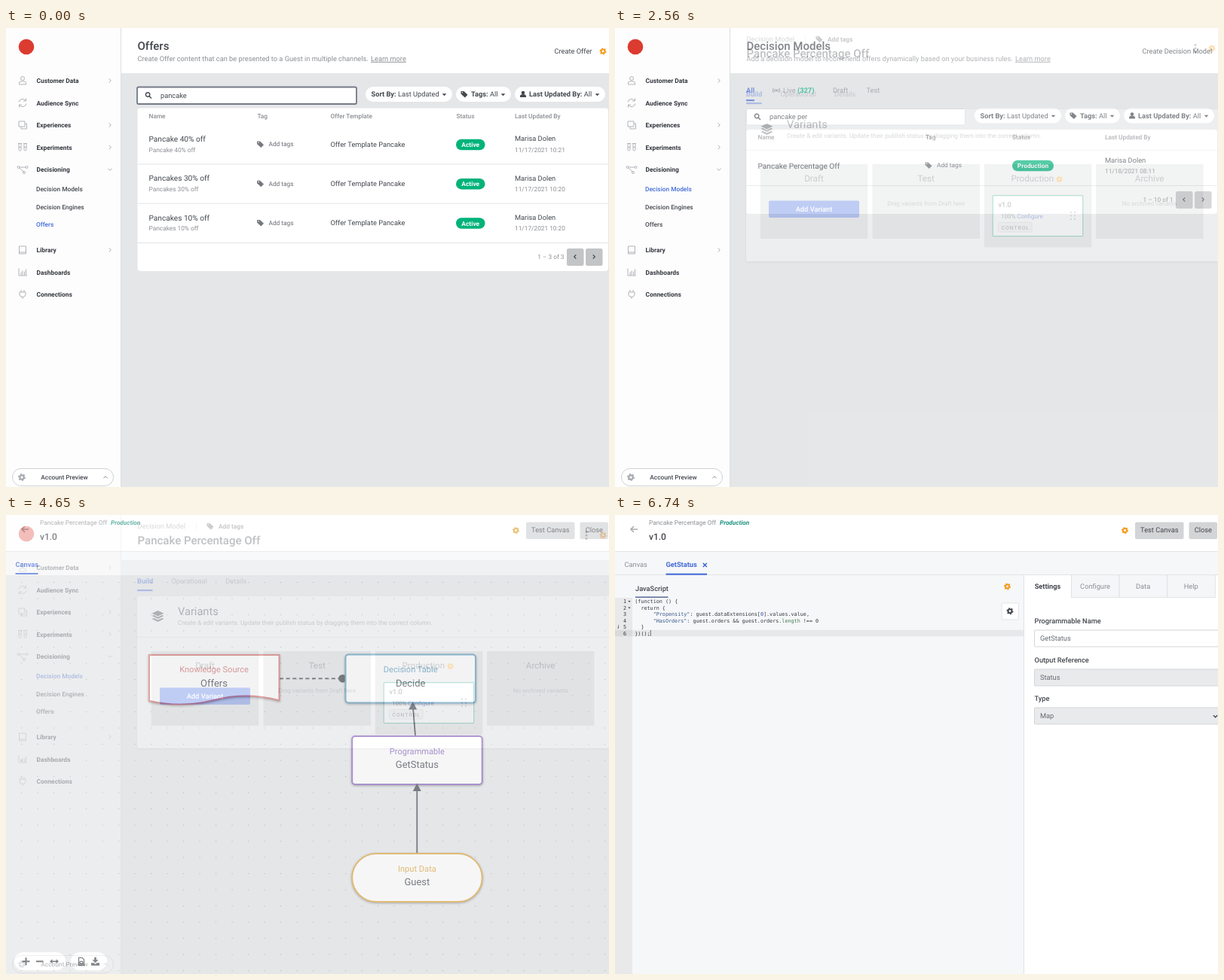
An HTML page for the animation above (8 s loop, 800 by 610 pixels).

```html
<!DOCTYPE html>
<html lang="en">
<head>
<meta charset="utf-8">
<title>Decision model walkthrough</title>
<style>
html, body { margin: 0; width: 100%; height: 100%; overflow: hidden; background: #fff; }
svg { display: block; width: 800px; height: 610px; font-family: Roboto, Arial, sans-serif; text-rendering: geometricPrecision; }
text { white-space: pre; }
.code { font-family: "DejaVu Sans Mono", monospace; }
.raised { filter: drop-shadow(0 1.5px 1.5px #0006); }
</style>
</head>
<body>
<svg id="stage" viewBox="0 0 800 610"></svg>
<script>
const INK = '#43474e', GREY = '#8b8e93', PALE = '#a9acb1', BLUE = '#4169d8',
  GREEN = '#00b37a', ORANGE = '#f49b1b', BACK = '#e5e6e8', LINE = '#e2e3e5';
const SMALL = 8.3, BODY = 9.25, NAME = 10.15, TITLE = 15;

// Text is placed by the middle of its capitals.
const text = (s, x, y, size = BODY, fill = INK, weight = 400, extra = '') =>
  `<text x="${x}" y="${y + size * .36}" font-size="${size}" fill="${fill}" font-weight="${weight}" ${extra}>${s}</text>`;
const mid = (s, x, y, size, fill, weight) => text(s, x, y, size, fill, weight, 'text-anchor="middle"');
const end = (s, x, y, size, fill, weight) => text(s, x, y, size, fill, weight, 'text-anchor="end"');
const box = (x, y, w, h, fill, r = 0, extra = '') =>
  `<rect x="${x}" y="${y}" width="${w}" height="${h}" rx="${r}" fill="${fill}" ${extra}/>`;
const dot = (x, y, r, fill) => `<circle cx="${x}" cy="${y}" r="${r}" fill="${fill}"/>`;
const border = (color, width = 1) => `stroke="${color}" stroke-width="${width}"`;
const line = (d, x, y, color = INK, width = 1) =>
  `<path transform="translate(${x} ${y})" d="${d}" fill="none" ${border(color, width)}/>`;
const solid = (d, x, y, fill = INK) => `<path transform="translate(${x} ${y})" d="${d}" fill="${fill}"/>`;

const gear = (x, y, r, color) => `<g transform="translate(${x} ${y})" fill="none" stroke="${color}">
  <circle r="${r * .55}" stroke-width="${r * .45}"/>
  <circle r="${r * .85}" stroke-width="${r * .3}" pathLength="12" stroke-dasharray="1"/></g>`;
const tag = (x, y, color = INK) =>
  solid('M-4.5-4H-.5L4.5 .8L.8 4.5L-4.5-.5ZM-3.3-2.2a.8 .8 0 1 0 1.6 0a.8 .8 0 1 0-1.6 0', x, y, color);
const caret = (x, y) => solid('M-2.8-1.4H2.8L0 1.6Z', x, y);
const chevron = (x, y, color = PALE, turn = 0, width = 1) =>
  `<g transform="translate(${x} ${y}) rotate(${turn})">${line('M-1.3-2.6L1.3 0L-1.3 2.6', 0, 0, color, width)}</g>`;

const icons = {
  user: 'M-2.5-3a2.5 2.5 0 1 0 5 0a2.5 2.5 0 1 0-5 0M-4.5 5V3Q-4.5 1-2 1H2Q4.5 1 4.5 3V5Z',
  sync: 'M-5-1A5 5 0 0 1 4-3M4.5-6V-2.5H1M5 1A5 5 0 0 1-4 3M-4.5 6V2.5H-1',
  pages: 'M-5-5H3V2H-5ZM3-2H5.5V5H-2V2',
  tubes: 'M-6-5H-1M1-5H6M-5-5V3a1.5 1.5 0 0 0 3 0V-5M2-5V3a1.5 1.5 0 0 0 3 0V-5M-5 0h3M2 0h3',
  nodes: 'M-4-3H4M-4-2L1 3M-7-3a1.5 1.5 0 1 0 3 0a1.5 1.5 0 1 0-3 0M4-3a1.5 1.5 0 1 0 3 0a1.5 1.5 0 1 0-3 0M.5 4a1.5 1.5 0 1 0 3 0a1.5 1.5 0 1 0-3 0',
  book: 'M-4.5-5H4.5V5H-4.5ZM-4.5 3H4.5',
  chart: 'M-5-5V4.5H6M-2 4V0M0 4V-2M2.5 4V-1M4.5 4V-4',
  plug: 'M-2-6V-3M2-6V-3M-4-3H4V0A4 3.5 0 0 1-4 0ZM0 3.5V6',
};
const menu = [
  ['Customer Data', 70, 'user', 0], ['Audience Sync', 99.5, 'sync'], ['Experiences', 129, 'pages', 0],
  ['Experiments', 158.5, 'tubes', 0], ['Decisioning', 188, 'nodes', 90], ['Library', 295, 'book', 0],
  ['Dashboards', 324.5, 'chart'], ['Connections', 354, 'plug'],
];

function shell(active) {
  const items = menu.map(([label, y, icon, turn]) =>
    line(icons[icon], 22, y, PALE, .9) + text(label, 40.5, y, 8.4, '#33373e', 600) +
    (turn === undefined ? '' : chevron(138, y, PALE, turn)));
  const subs = ['Decision Models', 'Decision Engines', 'Offers'].map((label, i) =>
    text(label, 40, 214 + i * 23.7, SMALL, label === active ? BLUE : INK, 500));
  return box(0, 0, 800, 610, BACK) + box(0, 0, 152.5, 610, '#fdfdfd') + box(153, 0, 647, 60, '#fff') +
    box(152, 0, 1, 610, '#dddfe1') + dot(27, 25, 10.3, '#dc3b30') + items.join('') + subs.join('') +
    box(8.5, 585.5, 134, 23, '#fff', 11.5, border('#cfd1d4')) + gear(21, 597, 5, PALE) +
    mid('Account Preview', 77.5, 597, SMALL, INK, 500) + chevron(132, 597, GREY, -90);
}

function heading(title, note, linkX) {
  return text(title, 174.5, 24, TITLE, INK, 500) + text(note, 174.5, 40.5, BODY, GREY) +
    text('Learn more', linkX, 40.5, BODY, GREY, 400, 'text-decoration="underline"');
}

function filters(y, query, focused) {
  const field = focused
    ? box(174, y - 9.5, 291, 22.5, '#fff', 2, border('#747b87', 1.8))
    : box(174.5, y - 9, 290, 21.5, '#fff', 1, border('#d6d8da'));
  const pill = (x, w) => box(x, y - 10, w, 20, '#fff', 10) + caret(x + w - 10.5, y + .7);
  const pair = (label, value, x) =>
    text(`<tspan font-weight="600">${label}</tspan> ${value}`, x, y, BODY);
  return field + line('M-3.6-1a2.7 2.7 0 1 0 5.4 0a2.7 2.7 0 1 0-5.4 0M1 1L4 4', 189, y + 1.5, INK, 1.4) +
    text(query, 205, y + 1.5, BODY) +
    pill(477, 115) + pair('Sort By:', 'Last Updated', 484.5) +
    pill(597, 73) + tag(608, y) + pair('Tags:', 'All', 617) +
    pill(675, 120) + dot(686, y - 2, 2.3, INK) + solid('M-4 4V2.5Q-4 0 0 0T4 2.5V4Z', 686, y) +
    pair('Last Updated By:', 'All', 694);
}

const pager = (label, y) => end(label, 740.5, y, SMALL, GREY) + [744, 769].map((x, i) =>
  box(x, y - 11.5, 22.5, 23, '#c3c4c6', 2.5) + chevron(x + 11, y - .5, INK, i ? 0 : 180, 1.2)).join('');
const headers = (y, ...cells) => cells.map(([label, x]) => text(label, x, y, SMALL, GREY, 500)).join('');
const badge = (label, x, y, w) => box(x, y - 7.3, w, 14.6, GREEN, 7.3) + mid(label, x + w / 2, y, 8.4, '#fff', 700);
const author = (x, y, date) => text('Marisa Dolen', x, y, BODY) + text(date, x, y + 14.8, SMALL, GREY);
const addTags = (x, y) => tag(x, y, '#75787d') + text('Add tags', x + 11, y, SMALL, '#65696f');
const tab = (label, x, y, on) => text(label, x, y, BODY, on ? BLUE : GREY, on ? 600 : 400);

function offers() {
  const row = (name, y, time) => text(name, 189.5, y - 7, NAME) + text(name, 189.5, y + 7.5, SMALL, GREY) +
    addTags(337.5, y) + text('Offer Template Pancake', 430.5, y) + badge('Active', 597, y + .5, 38.5) +
    author(675, y - 7.5, '11/17/2021 ' + time) + box(174.5, y + 26, 624, 1, LINE);
  return shell('Offers') +
    heading('Offers', 'Create Offer content that can be presented to a Guest in multiple channels.', 484) +
    text('Create Offer', 727.5, 31) + gear(792, 31, 4.5, ORANGE) + filters(88, 'pancake', true) +
    box(174.5, 106.5, 624.5, 216.5, '#fff', 4) +
    headers(117.5, ['Name', 189.5], ['Tag', 333.5], ['Offer Template', 430.5], ['Status', 597.5], ['Last Updated By', 675]) +
    row('Pancake 40% off', 154.5, '10:21') + row('Pancakes 30% off', 206.7, '10:20') +
    row('Pancakes 10% off', 259, '10:20') + pager('1 – 3 of 3', 304.5);
}

function models() {
  const live = 'M-1.8-2Q-3 0-1.8 2M1.8-2Q3 0 1.8 2M-3.8-3Q-5.6 0-3.8 3M3.8-3Q5.6 0 3.8 3';
  return shell('Decision Models') +
    heading('Decision Models', 'Add a decision model to recommend offers dynamically based on your business rules.', 531) +
    text('Create Decision Model', 699.5, 31) +
    tab('All', 174, 83, true) + box(174, 95, 11, 2.2, BLUE) +
    line(live, 214, 83, GREY) + dot(214, 83, 1.2, GREY) + tab('Live', 223, 83) +
    text('(327)', 242, 83, BODY, GREEN, 600) + tab('Draft', 289, 83) + tab('Test', 333.5, 83) +
    filters(116.5, 'pancake per', false) + box(174.5, 135, 624.5, 112, '#fff', 4) +
    headers(145.5, ['Name', 189.5], ['Tag', 412], ['Status', 527], ['Last Updated By', 650]) +
    text('Pancake Percentage Off', 189.5, 183, NAME) + addTags(416, 182.5) +
    badge('Production', 527, 183, 55) + author(650, 175.5, '11/18/2021 08:11') +
    box(174.5, 209, 624, 1, LINE) + pager('1 – 10 of 1', 228.5);
}

function variants() {
  const column = (label, x, h = 99) => box(x, 181, 142.5, h, '#dbdcde') +
    mid(label, x + (label === 'Production' ? 64 : 71.2), 200, 11.7, '#65696f');
  const grip = [245, 249.5, 254].map(y => dot(605, y, .9, GREY) + dot(610, y, .9, GREY)).join('');
  const kebab = [22.5, 27, 31.5].map(y => dot(770, y, 1.5, '#75787d')).join('');
  return shell('Decision Models') + text('Decision Model', 174.5, 15, BODY, GREY) +
    box(252, 10, 1, 11, LINE) + tag(271, 15, '#65696f') + text('Add tags', 282, 15.5, SMALL, INK, 500) +
    text('Pancake Percentage Off', 174.5, 34, TITLE, INK, 500) + kebab + gear(792, 27, 4.5, ORANGE) +
    tab('Build', 174, 87.5, true) + box(174, 99, 20.5, 2.2, BLUE) +
    tab('Operational', 219.5, 87.5) + tab('Details', 291, 87.5) +
    box(174, 108, 627, 202, '#fff', 2, 'style="filter:drop-shadow(0 1px 1px #0002)"') + box(174, 162, 626, 1, LINE) +
    solid('M0-7.5L8-3.8L0 0L-8-3.8ZM-8-.5L-5.5-1.5L0 1.2L5.5-1.5L8-.5L0 3.5ZM-8 3.5L-5.5 2.4L0 5L5.5 2.4L8 3.5L0 7.5Z', 201.5, 134.5) +
    text('Variants', 228, 127.5, 14.6) +
    text('Create &amp; edit variants. Update their publish status by dragging them into the correct column.', 228, 143.5, SMALL, GREY) +
    column('Draft', 192.8) + column('Test', 341.5) + column('Production', 489.8, 110.5) + column('Archive', 638) +
    box(204, 229.5, 120, 22.5, '#4169e1', 2) + mid('Add Variant', 264, 240.5, BODY, '#fff', 500) +
    mid('Drag variants from Draft here', 412.7, 233, 8, GREY) + mid('No archived variants', 709.2, 233, 8, GREY) +
    gear(589.5, 201, 4.3, ORANGE) + box(501.2, 222.7, 119.5, 54, '#fff', 1, border('#2ea58a', 1.2)) +
    text('v1.0', 508.5, 234.5) + text(`100% <tspan fill="${BLUE}">Configure</tspan>`, 512, 250, 8, '#65696f') +
    box(508.5, 258.5, 44.5, 12.5, '#f4f4f5', 2, border('#d8d9db')) +
    text('CONTROL', 512.5, 265, 7, '#75787d', 500, 'letter-spacing=".85"') + grip;
}

function toolbar(gearColor) {
  return box(0, 0, 800, 48, '#fff') + box(0, 48, 800, 32, '#f6f7f8') + box(0, 48, 800, 1, LINE) +
    line('M5 0H-4M0-4L-4 0L0 4', 25, 19, PALE, 1.6) + text('Pancake Percentage Off', 45, 9.8, SMALL, GREY) +
    text('Production', 139, 9.8, 8.2, '#1f9180', 600, 'font-style="italic"') + text('v1.0', 45, 28.5, 12, INK, 500) +
    gear(676.5, 20.5, 4.5, gearColor) + box(690, 9.5, 64.5, 22.5, '#d3d4d6', 2) + mid('Test Canvas', 722.3, 20) +
    box(761.5, 9.5, 37.5, 22.5, '#d3d4d6', 2) + mid('Close', 780.3, 20);
}

function canvas() {
  const labels = (kind, name, x, y, color) => mid(kind, x, y, 11.1, color) + mid(name, x, y + 18, 13);
  const node = (kind, name, x, y, color, r = 4) =>
    box(x, y, 172.5, 64, '#fff', r, `${border(color, 2)} class="raised"`) + labels(kind, name, x + 86.2, y + 19.8, color);
  return box(0, 0, 800, 610, BACK) +
    `<defs><pattern id="dots" x="20" y="89" width="21.5" height="21.5" patternUnits="userSpaceOnUse">
      <rect width="1.1" height="1.1" fill="#a3a5a8"/></pattern></defs>` +
    box(0, 80, 800, 530, 'url(#dots)') + toolbar('#e0a53a') +
    tab('Canvas', 12.5, 66, true) + box(12.5, 77, 30, 2, BLUE) +
    `<path d="M190 186H362.5V246.5Q319 235 276 246T190 247Z" fill="#fff" ${border('#d57575', 2)} class="raised"/>` +
    labels('Knowledge Source', 'Offers', 276, 205.5, '#d57575') +
    `<path d="M363 217.3H442" ${border(INK, 1.8)} stroke-dasharray="5 3.6"/>` + dot(446.5, 217.3, 5.4, INK) +
    node('Decision Table', 'Decide', 450.5, 185.5, '#5f9ebf') +
    node('Programmable', 'GetStatus', 459.2, 294, '#8a67bd') +
    node('Input Data', 'Guest', 459.2, 450, '#dfa63c', 32) +
    line('M543 293L540 256M545.3 449V364', 0, 0, INK, 1.8) +
    solid('M0 0L5.5 10.5H-5.5Z', 539.7, 248) + solid('M0 0L5.5 10.5H-5.5Z', 545.3, 356.5) +
    box(11, 581, 68, 24, '#fff', 12) + box(86, 581, 48, 24, '#fff', 12) +
    line('M-5 0H5M0-5V5M13.5 0H23', 26.5, 593.3, INK, 2) + line('M-4 0H4', 64, 593.3, INK, 1.6) +
    solid('M-6 0L-2.5-3V3ZM6 0L2.5-3V3Z', 64, 593.3) +
    line('M-3.5-5H1L3.5-2.5V5H-3.5ZM-1.8 0H1.8V3H-1.8Z', 100, 593.3, INK, 1.2) +
    solid('M-1.3-5.5H1.3V-2H4L0 2L-4-2H-1.3ZM-5.5 2H-2L0 3.7L2 2H5.5V5.5H-5.5Z', 118.5, 593.3);
}

function editor() {
  const str = s => `<tspan fill="#37578a">"${s}"</tspan>`;
  const source = [
    [0, '(function () {'], [2, 'return {'],
    [6, str('Propensity') + ': guest.dataExtensions[<tspan fill="#2b4bb0">0</tspan>].values.value,'],
    [6, str('HasOrders') + ': guest.orders &amp;&amp; guest.orders.<tspan fill="#3f7a4e">length</tspan> !== 0'],
    [2, '}'], [0, '})();'],
  ];
  const mono = (s, x, y, anchor = 'start') => text(s, x, y, 6.75, '#33363b', 400, `class="code" text-anchor="${anchor}"`);
  const code = source.map(([indent, s], i) => {
    const y = 114.8 + i * 8.5;
    return mono(i + 1, 15, y, 'end') + mono(s, 26.3 + indent * 4.06, y) +
      (i < 2 ? solid('M-1.7-.8H1.7L0 1.2Z', 19, y) : '');
  }).join('');
  const tabs = ['Configure', 'Data', 'Help'].map((label, i) => {
    const x = 605 + i * 63.6;
    return box(x + .5, 79.5, 63.6, 30, '#f5f6f8', 0, border(LINE)) + mid(label, x + 32, 95, BODY, GREY);
  }).join('');
  const field = (label, value, y, fill) => text(label, 556.5, y - 23.5, BODY, INK, 500) +
    box(556.5, y - 11, 250, 22, fill, 1, border('#d3d5d8')) + text(value, 564, y, BODY, '#65696f');
  return box(0, 0, 800, 610, '#f6f7f9') + toolbar(ORANGE) +
    box(0, 79, 800, 1, LINE) + tab('Canvas', 12.5, 66) + tab('GetStatus', 67.5, 66, true) +
    line('M-2.5-2.5L2.5 2.5M2.5-2.5L-2.5 2.5', 119.3, 66.5, BLUE, 1.6) + box(67.5, 77.7, 54.5, 2, BLUE) +
    text('JavaScript', 27, 97.3, BODY, INK, 500) + box(27, 108.5, 43.5, 1.4, '#4d638f') +
    gear(520.5, 95, 4.5, ORANGE) + box(513, 117, 22.5, 22, '#fff', 1, border(LINE)) + gear(524, 127.7, 4.5, INK) +
    box(0, 110, 23, 500, '#e9e9ea') + box(23, 152.8, 519, 8.5, '#e7e8ea') + box(0, 152.8, 23, 8.5, '#d9dadb') +
    code + text('i', 3.5, 148.8, 6.5, INK, 700, 'font-style="italic"') + box(46.8, 153, .7, 8, '#333') +
    box(542, 80, 258, 530, '#fff') + tabs + box(542, 80, 1, 530, LINE) + mid('Settings', 574, 95, BODY, INK, 600) +
    field('Programmable Name', 'GetStatus', 164, '#fff') + field('Output Reference', 'Status', 216, '#e9eaec') +
    field('Type', 'Map', 267, '#e9eaec') + chevron(796.5, 267.5, INK, 90, 1.4);
}

const stage = document.getElementById('stage');
stage.innerHTML = [offers, models, variants, canvas, editor].map(scene => `<g>${scene()}</g>`).join('');

// Each later scene fades over the previous one in three steps of 30 ms.
const LOOP = 8000, FIRST = 500, PERIOD = 2060, STEP = 30;
const layers = [...stage.children];

function draw() {
  const now = performance.now() % LOOP;
  layers.forEach((layer, i) => {
    if (!i) return;
    const steps = Math.floor((now - FIRST - (i - 1) * PERIOD) / STEP) + 1;
    const alpha = Math.min(Math.max(steps, 0), 3) / 3;
    layer.style.opacity = alpha;
    layer.style.display = alpha ? '' : 'none';
  });
  requestAnimationFrame(draw);
}
draw();
</script>
</body>
</html>
```
